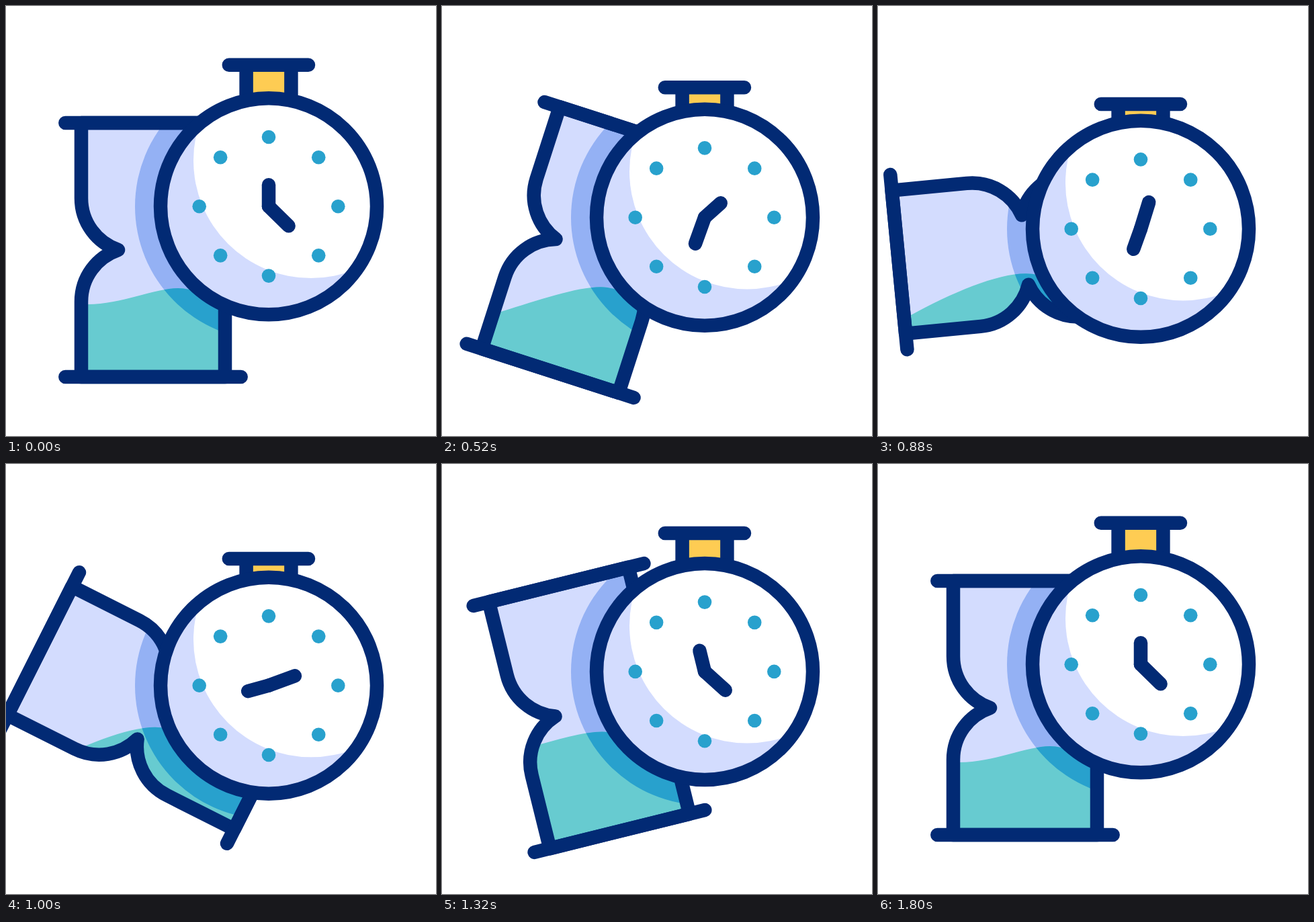
An HTML page for the animation above (2000 ms loop, 640x640 px).

```html
<!DOCTYPE html>
<html lang="en">
<head>
<meta charset="utf-8">
<title>Hourglass and stopwatch</title>
<style>
  html, body { margin: 0; width: 100%; height: 100%; overflow: hidden; background: #fff; }
  svg { display: block; width: 100vw; height: 100vh; }
  .line { fill: none; stroke: #022a74; stroke-width: 20.5; stroke-linecap: round; stroke-linejoin: round; }
</style>
</head>
<body>
<svg viewBox="0 0 640 640">
  <defs>
    <path id="body" d="M112 174V286C112 322 135 352 167 363C135 374 112 404 112 440V552H326V440C326 404 303 374 271 363C303 352 326 322 326 286V174Z"/>
    <clipPath id="inGlass"><use href="#body" class="turn"/></clipPath>
    <clipPath id="inSand"><path id="sand"/></clipPath>
    <clipPath id="inDial"><circle cx="391" cy="298.3" r="161"/></clipPath>
  </defs>

  <g clip-path="url(#inGlass)">
    <rect width="640" height="640" fill="#d3dcfe"/>
    <circle class="drop" cx="391" cy="298.3" r="199" fill="#94b1f4"/>
    <g clip-path="url(#inSand)">
      <rect width="640" height="640" fill="#67cbd0"/>
      <circle class="drop" cx="391" cy="298.3" r="199" fill="#28a1cd"/>
    </g>
  </g>
  <g class="turn line">
    <use href="#body"/>
    <path d="M88.3 174H349.7M88.3 552H349.7"/>
  </g>

  <g id="button">
    <path d="M358 88H424V150H358Z" fill="#fecc53"/>
    <path class="line" d="M331.8 87.7H450M357.6 88V145M424.4 88V145"/>
  </g>

  <g class="drop">
    <g clip-path="url(#inDial)">
      <rect x="220" y="127" width="342" height="342" fill="#d3dcfe"/>
      <circle cx="454" cy="230" r="175" fill="#fff"/>
    </g>
    <circle class="line" cx="391" cy="298.3" r="161"/>
    <g id="dots" fill="#28a1cd"></g>
    <g class="line">
      <path id="shortHand" d="M391 298.3V266.3"/>
      <path id="longHand" d="M391 298.3L420.6 327.3"/>
    </g>
  </g>
</svg>
<script>
const LOOP = 2000, MOVE = 1800;
const $ = id => document.getElementById(id);

const smooth = u => u * u * (3 - 2 * u);

// Eased progress from 0 to 1 between two times
function glide(t, from, to) {
  const u = Math.min(1, Math.max(0, (t - from) / (to - from)));
  return smooth(smooth(u));
}

const turnEase = u => u < 0.5 ? (2 * u) ** 2.96 / 2 : 1 - (2 - 2 * u) ** 2.96 / 2;

// One press: down, then a slower return
const pulse = t => glide(t, 140, 910) * (1 - glide(t, 760, 1720));

// The surface stays level on screen and leans more while the glass lies flat
function sandPath(t, angle) {
  const lean = Math.max(0, Math.sin(angle * Math.PI / 180));
  const lift = 32 * glide(t, 280, 1310) * (1 - glide(t, 1050, 1694));
  const width = 134 + 39 * lean;
  const slope = -0.55 * Math.sqrt(lean);
  const px = 256 - 36 * Math.sqrt(lean), py = 420 - lift;
  const x = px - width, y = py + 24 + 39 * lean;
  return `M${x - 80} ${y - 80 * slope}L${x} ${y}`
    + `C${x + width * 0.36} ${y + width * 0.36 * slope} ${px - width * 0.25} ${py} ${px} ${py}`
    + `C${px + 28} ${py} ${px + 50} ${py + 18} ${px + 90} ${py + 22}H640V700H-100Z`;
}

for (let i = 0; i < 8; i++) {
  const dot = document.createElementNS("http://www.w3.org/2000/svg", "circle");
  const nudge = i % 2 * 1.2; // diagonal dots sit slightly to the right
  dot.setAttribute("cx", 391 + nudge + 103.3 * Math.cos(i * Math.PI / 4));
  dot.setAttribute("cy", 298.3 + 103.3 * Math.sin(i * Math.PI / 4));
  dot.setAttribute("r", 10.3);
  $("dots").append(dot);
}

const turning = document.querySelectorAll(".turn");
const dropping = document.querySelectorAll(".drop");
const place = (el, transform) => el.setAttribute("transform", transform);

function draw(time) {
  const t = Math.min(time % LOOP, MOVE);
  const angle = 180 * turnEase(t / MOVE);
  turning.forEach(el => place(el, `rotate(${angle} 219 363)`));
  dropping.forEach(el => place(el, `translate(0 ${33.6 * pulse(t)})`));
  place($("button"), `translate(0 ${59 * pulse(t + 28)})`);
  place($("shortHand"), `rotate(${360 * glide(t, 0, 1680)} 391 298.3)`);
  place($("longHand"), `rotate(${360 * glide(t, 0, 1520)} 391 298.3)`);
  $("sand").setAttribute("d", sandPath(t, angle));
}

const start = performance.now();
function tick() {
  draw(performance.now() - start);
  requestAnimationFrame(tick);
}
tick();
</script>
</body>
</html>
```
